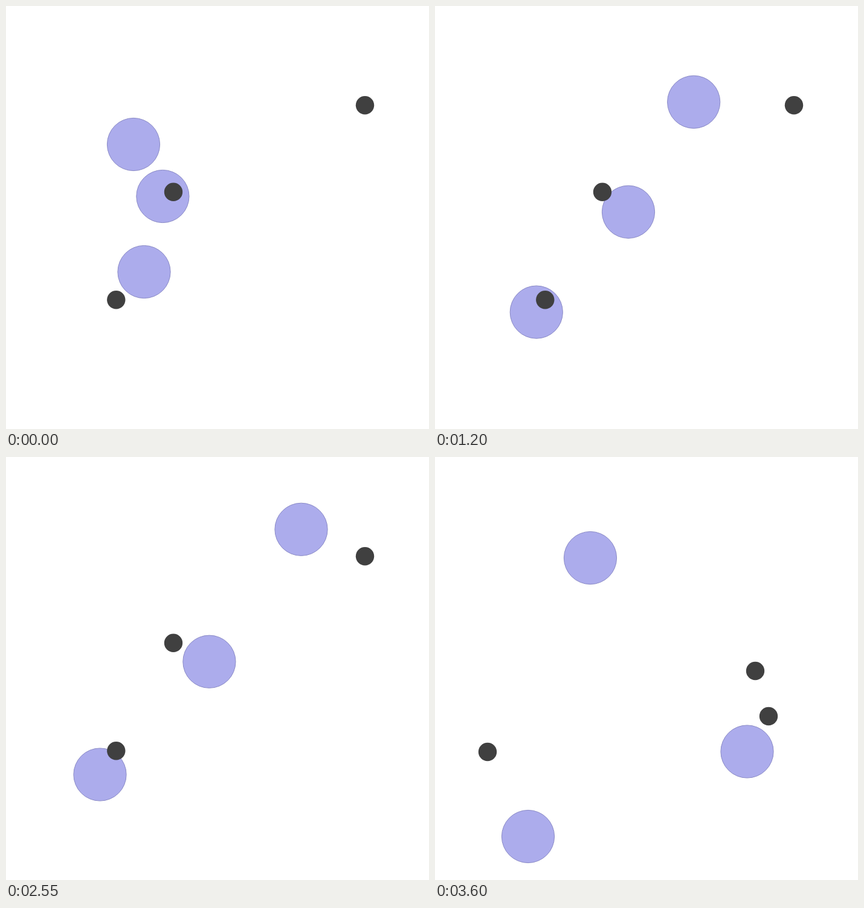
An HTML page for the animation above (3.75 s loop, 700x700 px).

```html
<!DOCTYPE html>
<html lang="en">
<head>
<meta charset="utf-8">
<title>Drifting circles</title>
<style>
  html, body { margin: 0; width: 100%; height: 100%; overflow: hidden; background: #fff; }
  svg { display: block; width: 100%; height: 100%; }
  .disc { fill: #acacec; stroke: #8a8ac6; stroke-width: 1; }
  .dot { fill: #404040; }
</style>
</head>
<body>
<svg id="stage" viewBox="0 0 700 700"></svg>
<script>
const STEP = 150, STEPS = 25, RESET = STEPS - 1;

// Each disc drifts on a smooth curve through a few [step, x, y] keys, then jumps to end.
const items = [
  { type: "disc", end: [257, 167], keys: [
    [0, 211, 229], [3, 301.4, 219], [5, 377.4, 204], [7, 419.4, 173],
    [10, 442.4, 136], [13, 500, 132.8], [15, 505.4, 123],
    [17, 488.5, 119.8], [19, 470.4, 104], [21, 469.8, 113.7], [23, 460.4, 122]] },
  { type: "disc", end: [516.5, 487.5], keys: [
    [0, 259.4, 315], [3, 281.8, 332], [8, 320, 340.8],
    [13, 335, 339.5], [17, 336.4, 338.7], [21, 345.6, 328.6]] },
  { type: "disc", end: [154, 628], keys: [
    [0, 228.5, 440], [3, 184.5, 463.3], [8, 167.8, 506.6],
    [13, 161, 512.8], [17, 155.5, 525.5], [21, 152.5, 528.7]] },
  { type: "dot", keys: [[0, 594, 164.3]], end: [530, 354] },
  { type: "dot", keys: [[0, 277, 307.7]], end: [552, 429] },
  { type: "dot", keys: [[0, 182.3, 486.2]], end: [87, 488] }
];
const radius = { disc: 43.6, dot: 15.2 };

function slope(keys, i, axis) {
  const a = keys[Math.max(0, i - 1)], b = keys[Math.min(keys.length - 1, i + 1)];
  return (b[axis] - a[axis]) / (b[0] - a[0]);
}

function positionAt({ keys, end }, step) {
  if (step === RESET) return end;
  const next = keys.findIndex(key => key[0] > step);
  if (next < 0) return keys[keys.length - 1].slice(1);
  const a = keys[next - 1], b = keys[next];
  const span = b[0] - a[0], u = (step - a[0]) / span, v = 1 - u;
  return [1, 2].map(axis =>
    v * v * ((1 + 2 * u) * a[axis] + u * span * slope(keys, next - 1, axis)) +
    u * u * ((1 + 2 * v) * b[axis] - v * span * slope(keys, next, axis)));
}

for (const item of items) {
  item.node = document.createElementNS("http://www.w3.org/2000/svg", "circle");
  item.node.setAttribute("class", item.type);
  item.node.setAttribute("r", radius[item.type]);
  document.getElementById("stage").append(item.node);
}

const start = performance.now();
function draw() {
  const step = Math.floor((performance.now() - start) / STEP) % STEPS;
  for (const item of items) {
    const [x, y] = positionAt(item, step);
    item.node.setAttribute("cx", x);
    item.node.setAttribute("cy", y);
  }
  requestAnimationFrame(draw);
}
draw();
</script>
</body>
</html>
```
